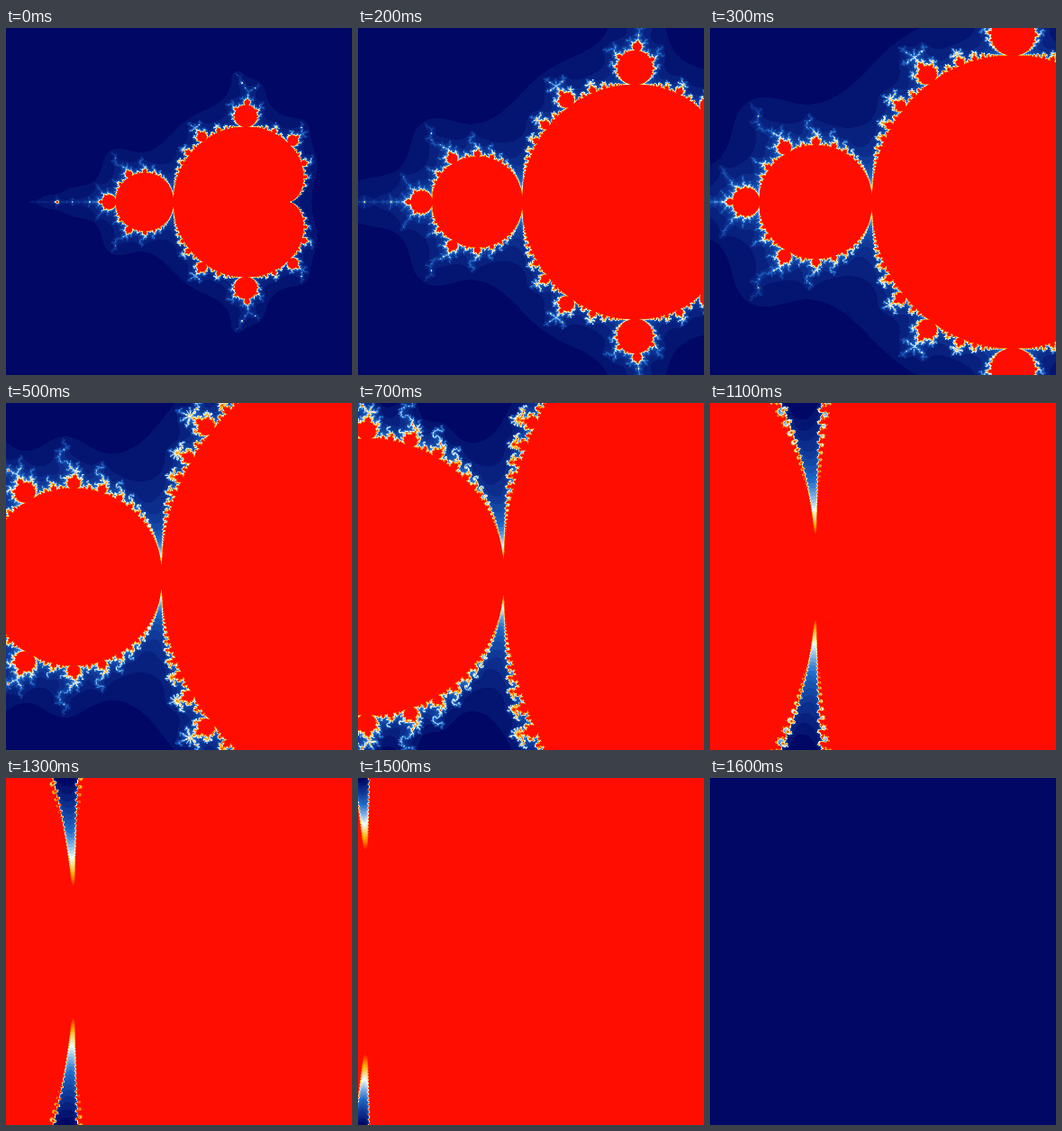
Recreate the animation shown at these times as an HTML page with a canvas. Size 384x385 px, loop 3 s.

```html
<!DOCTYPE html>
<html lang="en">
<head>
<meta charset="utf-8">
<title>Mandelbrot zoom</title>
<style>
html, body { margin: 0; width: 100%; height: 100%; overflow: hidden; background: #000764; }
canvas { display: block; width: 100vw; height: 100vh; image-rendering: pixelated; }
</style>
</head>
<body>
<canvas id="stage" width="384" height="385"></canvas>
<script>
const W = 384, H = 385, LOOP = 3000, STEP = 100, LAST = 16;
const MAX = 100, LEVELS = 33, FLOOR = 3;
const stops = [[0, 7, 100], [32, 107, 203], [237, 255, 255], [255, 170, 0], [254, 13, 0]];
const ctx = document.getElementById('stage').getContext('2d');

const palette = Array.from({ length: LEVELS }, (_, i) => {
  const p = i / (LEVELS - 1) * (stops.length - 1);
  const a = Math.min(Math.floor(p), stops.length - 2);
  return stops[a].map((v, j) => Math.round(v + (stops[a + 1][j] - v) * (p - a)));
});

// Hann window over four half-pixel samples
const hann = [-0.75, -0.25, 0.25, 0.75].map(d => (1 + Math.cos(Math.PI * d)) / 4);

function escapeTime(cx, cy) {
  // Main cardioid and the period-2 disc never escape
  const yy = cy * cy, d = cx - 0.25, q = d * d + yy;
  if (q * (q + d) <= yy / 4 || (cx + 1) ** 2 + yy <= 1 / 16) return MAX;
  let x = cx, y = cy, n = 1;
  while (n < MAX && x * x + y * y <= 4) {
    const t = x * x - y * y + cx;
    y = 2 * x * y + cy;
    x = t;
    n++;
  }
  return n;
}

function render(step) {
  const scale = W / 3 * 1.25 ** step;
  const cols = 2 * W + 2, rows = 2 * H + 2;
  // Counts at half-pixel spacing, blurred along x into one value per pixel column
  const line = new Float32Array(cols), blurred = new Float32Array(W * rows);
  let low = MAX;
  for (let j = 0; j < rows; j++) {
    const cy = (192.5 - j / 2 + 0.75) / scale;
    for (let i = 0; i < cols; i++) {
      line[i] = escapeTime(-0.7 + (i / 2 - 0.75 - 192) / scale, cy);
      if (line[i] < low) low = line[i];
    }
    for (let x = 0; x < W; x++) {
      for (let k = 0; k < 4; k++) blurred[j * W + x] += hann[k] * line[2 * x + k];
    }
  }
  low = Math.max(low, FLOOR);
  const range = MAX - low || 1;
  const img = ctx.createImageData(W, H);
  for (let y = 0, p = 0; y < H; y++) {
    for (let x = 0; x < W; x++, p += 4) {
      let n = 0;
      for (let k = 0; k < 4; k++) n += hann[k] * blurred[(2 * y + k) * W + x];
      const level = Math.floor(Math.max(0, n - low) / range * LEVELS);
      const rgb = palette[Math.min(LEVELS - 1, level)];
      for (let c = 0; c < 3; c++) img.data[p + c] = rgb[c];
      img.data[p + 3] = 255;
    }
  }
  return img;
}

const frames = Array.from({ length: LAST + 1 }, (_, k) => render(k));
let shown = -1;

function draw(now) {
  const k = Math.min(LAST, Math.floor(now % LOOP / STEP));
  if (k !== shown) ctx.putImageData(frames[shown = k], 0, 0);
  requestAnimationFrame(draw);
}
ctx.putImageData(frames[0], 0, 0);
requestAnimationFrame(draw);
</script>
</body>
</html>
```
